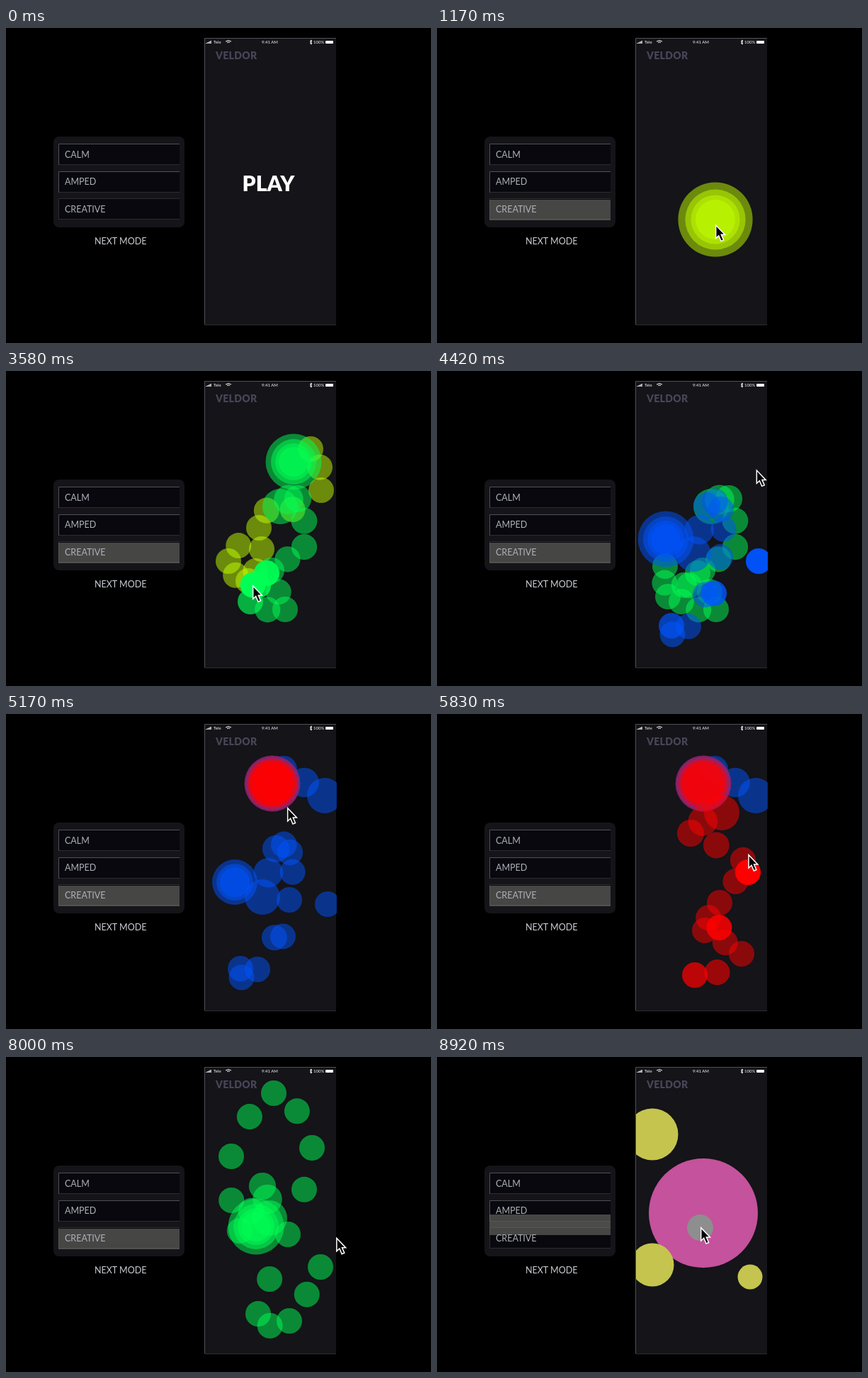
An HTML page with a canvas for the animation above (9.01 s loop, 600 by 444 pixels).

```html
<!DOCTYPE html>
<html lang="en">
<head>
<meta charset="utf-8">
<title>Colour trails</title>
<style>
  html, body { margin: 0; width: 100%; height: 100%; overflow: hidden; background: #000; }
  svg, canvas { position: absolute; left: 0; top: 0; width: 600px; height: 444px; }
  text { font-family: Lato, "Open Sans", sans-serif; fill: #c9ccd0; }
  .label { font-size: 12.5px; }
  #labels { fill: #adb0b8; }
  #labels text { fill: inherit; }
  .status { font-size: 6px; fill: #fff; }
  .title { font-size: 14px; font-weight: 900; fill: #474557; letter-spacing: .3px; }
  .play { font-size: 30px; font-weight: 900; fill: #fff; text-anchor: middle; }
  .panel { fill: #141419; }
  .row { fill: #08080e; }
  .edge { fill: none; stroke: #505056; }
  .faint { fill: none; stroke: #2c2c31; }
</style>
</head>
<body>
<svg viewBox="0 0 600 444">
  <rect class="panel" x="67" y="153" width="185" height="128" rx="8"/>
  <g id="rows"></g>
  <rect id="glow" x="74" y="242" width="171" height="29" fill="#70706a" fill-opacity=".6"/>
  <g id="labels" class="label"></g>
  <text class="label" x="125" y="304.5">NEXT MODE</text>
  <rect class="panel" x="280" y="14" width="186" height="405"/>
  <path class="edge" d="M280.5 418V14.5H466"/>
  <path class="faint" d="M281 418.5H466"/>
  <path d="M283 22v-1M285 22v-2M287 22v-3M289 22v-4" stroke="#fff" stroke-width="1.3"/>
  <text class="status" x="293" y="22">Tele</text>
  <path d="M310 19q4 -3 8 0M312 20.5q2 -1.5 4 0" fill="none" stroke="#fff"/>
  <text class="status" x="361" y="22">9:41 AM</text>
  <path d="M429 18l3 4l-1.5 1v-6l1.5 1l-3 4" fill="none" stroke="#fff" stroke-width=".8"/>
  <text class="status" x="434" y="22">100%</text>
  <rect x="451" y="18" width="11" height="4" rx="1" fill="#fff"/>
  <text class="title" x="296" y="44">VELDOR</text>
  <text id="play" class="play" x="370.5" y="230">PLAY</text>
</svg>
<canvas id="stage" width="600" height="444"></canvas>
<script>
const LOOP = 9010, TICK = 1000 / 12;
const LIFE = 1412, STEP = 44, R = 18;
const START = 330, SWITCH = 8660;
const LIME = '#c3ff00', GREEN = '#00ff55', BLUE = '#0055ff', RED = '#ff0000';
const $ = id => document.getElementById(id);
const ctx = $('stage').getContext('2d');
const clamp = (v, lo, hi) => Math.min(hi, Math.max(lo, v));
const mix = (a, b, k) => a + (b - a) * k;

['CALM', 'AMPED', 'CREATIVE'].forEach((name, i) => {
  const y = Math.round(163 + 38.7 * i);
  $('rows').innerHTML += `<rect class="row" x="74" y="${y}" width="171" height="30"/>
    <path class="${i < 2 ? 'edge' : 'faint'}" d="M74.5 ${y + 30}V${y + .5}H245"/>
    <path class="faint" d="M75 ${y + 29.5}H245"/>`;
  $('labels').innerHTML += `<text x="83" y="${182.5 + 38.5 * i}">${name}</text>`;
});

const dots = [];
const route = [];
const moveTo = (t, x, y) => route.push([t, x, y]);

// A press leaves rings in one place, each smaller than the last.
function press(color, t, x, y, shrink = .81) {
  for (let i = 0; i < 4; i++)
    dots.push({ color, t: t + i * 30, x, y, r: 39.5 * shrink ** i });
  moveTo(t, x, y + 5);
  moveTo(t + 90, x, y + 5);
}

// Catmull-Rom curve through the keys
function curve(keys, u) {
  const i = Math.min(Math.floor(u), keys.length - 2), f = u - i;
  const key = n => keys[clamp(n, 0, keys.length - 1)];
  return [0, 1].map(axis => {
    const [a, b, c, d] = [-1, 0, 1, 2].map(n => key(i + n)[axis]);
    return b + f / 2 * (c - a + f * (2 * a - 5 * b + 4 * c - d + f * (3 * (b - c) + d - a)));
  });
}

// A drag drops one disc per step, two steps to each key, settling to radius R.
function drag(color, start, keys) {
  for (let i = 0; i <= 2 * (keys.length - 1); i++) {
    const [x, y] = curve(keys, i / 2), t = start + i * STEP;
    dots.push({ color, t, x, y, r: R + 7 * .4 ** i });
    moveTo(t, x, y);
  }
}

moveTo(83, 538, 24);
moveTo(166, 538, 84);
moveTo(250, 538, 84);
moveTo(500, 393, 280);
press(LIME, 1760, 393, 270);
drag(LIME, 1971, [[423, 174], [396, 113], [375, 144], [361, 251], [342, 296],
  [314, 268], [357, 221], [445, 168], [430, 110]]);
press(GREEN, 2830, 406, 128);
drag(GREEN, 3010, [[387, 191], [412, 180], [421, 248], [375, 281], [394, 336],
  [345, 325], [368, 285], [326, 318], [322, 275]]);
press(BLUE, 3750, 323, 237);
drag(BLUE, 3850, [[362, 258], [381, 190], [401, 195], [400, 262], [355, 360],
  [331, 359], [454, 268]]);
drag(BLUE, 4424, [[450, 115], [392, 78]]);
press(BLUE, 4700, 376, 98, .98);
press(RED, 4980, 376, 98, .9);
drag(RED, 5190, [[402, 139], [358, 168], [432, 206], [399, 266], [378, 305],
  [430, 338], [364, 368], [439, 223], [423, 163], [363, 182]]);
press(LIME, 6150, 335, 223);
press(GREEN, 6720, 353, 239);
drag(GREEN, 6985, [[372, 227], [362, 182], [330, 245], [318, 140], [378, 51],
  [432, 128], [398, 250], [356, 362], [400, 372], [444, 296]]);
moveTo(8160, 482, 225);
moveTo(8260, 482, 225);
moveTo(8750, 372, 240);
moveTo(LOOP, 372, 240);

function disc(x, y, r, color, alpha) {
  ctx.globalAlpha = alpha;
  ctx.fillStyle = color;
  ctx.beginPath();
  ctx.arc(x, y, r, 0, 7);
  ctx.fill();
}

function drawTrails(t) {
  const swell = (t - 915) / 845;
  if (swell > 0 && swell < 1) {
    const r = R + 43 * Math.sin(Math.PI * swell);
    for (let i = 0; i < 4; i++) disc(393, 270, r * .81 ** i, LIME, .5);
  }
  for (const d of dots) {
    const age = t - d.t;
    if (age >= 0 && age <= LIFE)
      disc(d.x, d.y, d.r, d.color, clamp(1.08 - age / 320, .5, 1));
  }
}

function drawBubbles(t) {
  const a = clamp((t - SWITCH) / 200, 0, 1);
  disc(376, 220, 77, '#c4529c', a);
  disc(304, 109, 36.5, '#c4c44f', a);
  disc(304, 293, 30.5, '#c4c44f', a);
  disc(442, 310, 17.5, '#c4c44f', a);
  disc(371.5, 240.5, 18.5, '#8e8e8e', a);
}

const arrow = new Path2D('M.7 .7V19L4.7 15.3L8 23L11.6 21.5L8.3 14H13.5Z');

function drawCursor(t) {
  if (t < 83) return;
  const i = route.findIndex(p => p[0] > t);
  const [t0, x0, y0] = route[i - 1], [t1, x1, y1] = route[i];
  const k = (t - t0) / (t1 - t0);
  ctx.save();
  ctx.globalAlpha = 1;
  ctx.translate(mix(x0, x1, k), mix(y0, y1, k));
  ctx.fillStyle = '#000';
  ctx.strokeStyle = '#fff';
  ctx.lineWidth = 1.5;
  ctx.fill(arrow);
  ctx.stroke(arrow);
  ctx.restore();
}

function draw() {
  const now = performance.now() % LOOP;
  const t = Math.min(Math.floor((now + 4) / TICK), 107) * TICK;
  const on = t > START;
  $('play').style.display = on ? 'none' : '';
  $('glow').style.display = on ? '' : 'none';
  $('glow').setAttribute('y', 242 - 20 * clamp((t - 8830) / 86, 0, 1));

  ctx.clearRect(0, 0, 600, 444);
  ctx.save();
  ctx.beginPath();
  ctx.rect(281, 15, 186, 404);
  ctx.clip();
  (t < SWITCH ? drawTrails : drawBubbles)(t);
  ctx.restore();
  drawCursor(t);
  requestAnimationFrame(draw);
}
draw();
</script>
</body>
</html>
```
